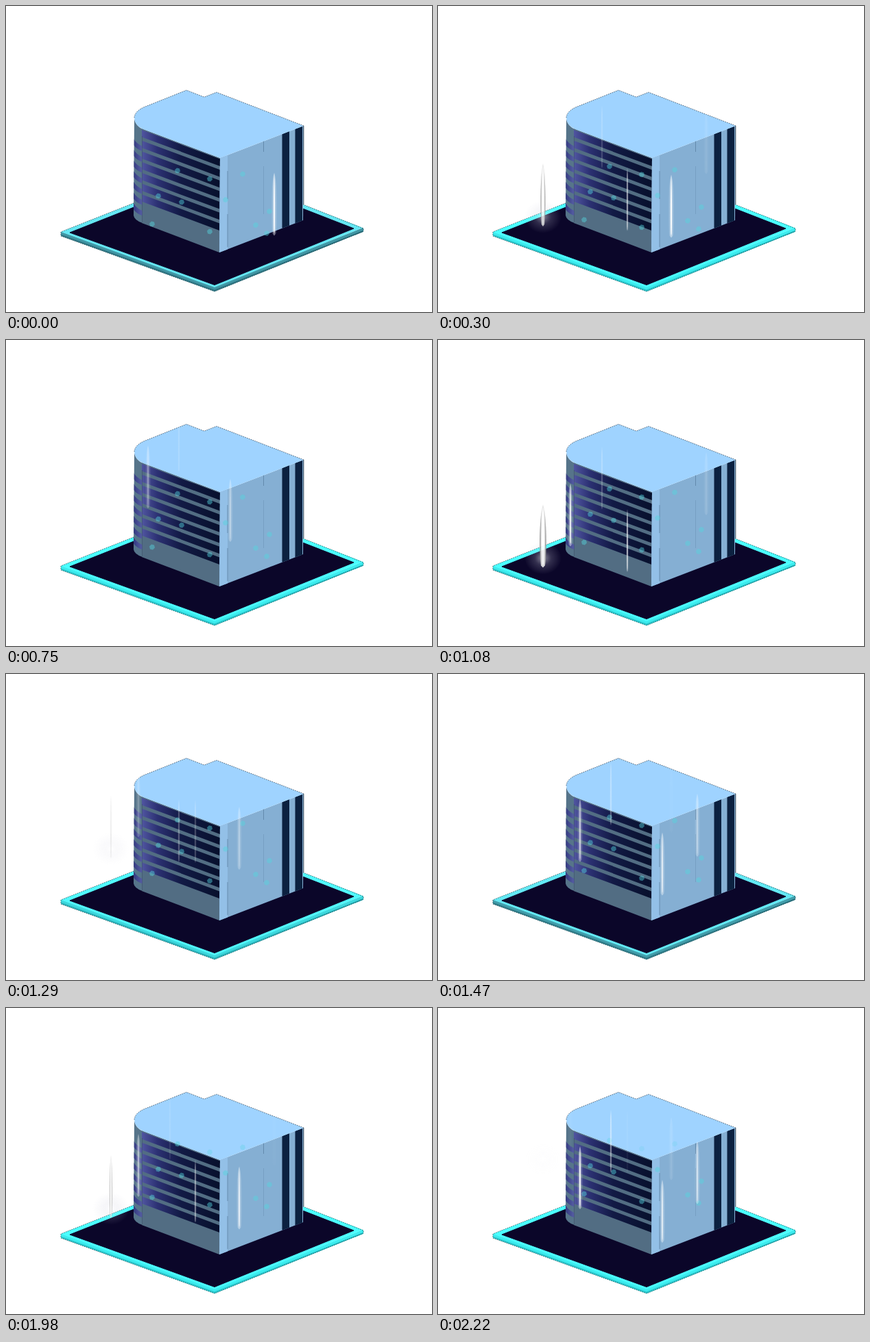
Write an HTML page that moves like this. It is 621 px wide and 447 px high and loops after 2250 ms.

```html
<!DOCTYPE html>
<html lang="en">
<head>
<meta charset="utf-8">
<title>Isometric building</title>
<style>
html, body { margin: 0; width: 100%; height: 100%; overflow: hidden; background: #fff; }
svg { display: block; width: 621px; height: 447px; }
</style>
</head>
<body>
<svg viewBox="0 0 621 447" xmlns="http://www.w3.org/2000/svg">
  <defs>
    <linearGradient id="stripe" gradientUnits="userSpaceOnUse" x1="198" y1="0" x2="312" y2="0">
      <stop offset="0" stop-color="#5055a0"/>
      <stop offset=".2" stop-color="#2c3173"/>
      <stop offset=".5" stop-color="#121a45"/>
      <stop offset="1" stop-color="#07102c"/>
    </linearGradient>
    <linearGradient id="bend" gradientUnits="userSpaceOnUse" x1="186" y1="0" x2="199" y2="0">
      <stop offset="0" stop-color="#343a80"/>
      <stop offset="1" stop-color="#5860a6"/>
    </linearGradient>
    <linearGradient id="beam">
      <stop offset="0" stop-color="#fff" stop-opacity="0"/>
      <stop offset=".5" stop-color="#fff" stop-opacity=".55"/>
      <stop offset="1" stop-color="#fff" stop-opacity="0"/>
    </linearGradient>
    <linearGradient id="metal">
      <stop offset="0" stop-color="#888"/>
      <stop offset=".3" stop-color="#e6e6e6"/>
      <stop offset=".7" stop-color="#e6e6e6"/>
      <stop offset="1" stop-color="#888"/>
    </linearGradient>
    <radialGradient id="halo">
      <stop offset="0" stop-color="#fff" stop-opacity=".6"/>
      <stop offset=".45" stop-color="#ccd" stop-opacity=".22"/>
      <stop offset="1" stop-color="#ccd" stop-opacity="0"/>
    </radialGradient>
    <clipPath id="front"><path d="M198 179L312 222L311 360L198 317Z"/></clipPath>
    <clipPath id="corner"><path d="M187 165Q189 175 199 180V317Q187 313 186 306Z"/></clipPath>
  </defs>

  <g stroke-linejoin="round">
    <path id="side" d="M81 331L304 411L520 325V329L304 416L81 335Z" stroke-width="2"/>
    <path id="edge" d="M81 335L304 415.500L520 329" fill="none" stroke-width="2"/>
    <path id="rim" d="M80 330L306 240.500L520 324L304 411Z"/>
    <path d="M93 331L306 246.500L507 325L304 407.500Z" fill="#0b0629" stroke="#0b0629"/>
    <path d="M186 288L80 330V336L304 417L521 329V325L433 290" fill="none" stroke="#123a42" stroke-width=".8" stroke-dasharray="1.5 1.5"/>
  </g>

  <path d="M187 165Q189 175 199 180V317Q187 313 186 306Z" fill="#56748a"/>
  <path d="M198 179L312 222L311 360L198 317Z" fill="#526d83"/>
  <g id="bends" clip-path="url(#corner)" fill="url(#bend)"/>
  <g id="stripes" clip-path="url(#front)" fill="url(#stripe)"/>
  <path d="M198.5 190V316" stroke="#3b5068" stroke-width=".8" opacity=".7"/>
  <path d="M312 222L434 175L433 313L311 360Z" fill="#85afd3"/>
  <path d="M312 222L323 218V355.400L311 360Z" fill="#93c0e7"/>
  <g id="bands" fill="#0c2140"/>
  <path d="M323 241V282M323 304V352M375.500 196V213" stroke="#517799" stroke-width=".8" opacity=".8"/>
  <path d="M375.500 234V304" stroke="#517799" stroke-width=".8" opacity=".35"/>
  <path d="M187 163Q188 153 203 147L263 123L289 133L307 126L434 175L312 222L200 180Q187 174 187 163Z" fill="#9fd3ff"/>
  <path d="M187 163Q188 153 203 147L263 123L289 133L307 126L434 175" fill="none" stroke="#26394b" stroke-width=".8" stroke-dasharray="1.500 1.500"/>
  <path d="M433.800 175V290" stroke="#26394b" stroke-width="1"/>
  <g id="dots" fill="#54d4dd"/>
  <g id="beams"/>
</svg>
<script>
const LOOP = 2250, STEP = 30;
const DRIFT = 0.0212;                          // lights, px per ms
const RISE = 0.3, PERIOD = 815, LIFE = 390;    // beams
const PULSE = 1490;                            // platform glow

const $ = id => document.getElementById(id);
const clamp = v => Math.max(0, Math.min(1, v));
const mix = (a, b, k) => `rgb(${a.map((v, i) => Math.round(v + (b[i] - v) * k))})`;

function set(el, attrs) {
  for (const k in attrs) el.setAttribute(k, attrs[k]);
  return el;
}
function add(parent, tag, attrs = {}) {
  return parent.appendChild(set(document.createElementNS("http://www.w3.org/2000/svg", tag), attrs));
}

// Walls
const roofY = x => x < 312 ? 180 + (x - 200) * 0.375 : 222 - (x - 312) * 0.385;
const footY = x => 360 - (x - 311) * 0.385;
for (let i = 0; i < 7; i++) {
  const y = 181 + i * 15.7, b = y + 13;
  add($("stripes"), "path", { d: `M198 ${y}l114 42.500v10.500l-114 -42.500Z` });
  add($("bends"), "path", { d: `M186 ${b}q4 7 13 11v7q-9 -3 -13 -9Z` });
}
for (const l of [402.5, 421.5]) {
  const r = l + 10.5;
  add($("bands"), "path", { d: `M${l} ${roofY(l)}L${r} ${roofY(r)}V${footY(r)}L${l} ${footY(l)}Z` });
}

// Drifting lights: x, starting y
const dots = [
  [250, 240.5], [297, 252.5], [345, 245.5], [222, 277.5], [256, 286.5], [320, 283],
  [384, 300], [364, 320], [380, 332], [213, 318.5], [297, 329.5]
].map(([x, y]) => ({ x, y, el: add($("dots"), "polygon", { points: "-4,-1 -1,-4 3,-3 4,1 1,4 -3,3" }) }));

// Rising beams: x, lowest y, first launch
const beams = [
  [153, 340, 240], [193, 312, 1045], [207, 300, 570], [239, 315, 40], [252, 275, 475],
  [276, 345, 245], [327, 346, 580], [340, 343, 285], [378, 318, 1300], [391, 343, -25]
].map(([x, base, first]) => {
  const g = add($("beams"), "g"), outside = x < 180;
  return {
    x, base, first, g, outside,
    width: x > 230 && x < 300 ? 4.5 : 10,
    halo: add(g, "ellipse", { cx: x, rx: outside ? 27 : 0, ry: 24, fill: "url(#halo)" }),
    glow: add(g, "path", { fill: outside ? "url(#metal)" : "url(#beam)" }),
    core: add(g, "path", { fill: "#fff" })
  };
});

function spindle(x, top, len, w) {
  const h = w / 2;
  return `M${x} ${top}c${h} ${len * 0.15} ${h} ${len * 0.85} ${h * 0.5} ${len - 3}` +
    `L${x} ${top + len}l${-h * 0.5} -3c${-h * 0.5} ${-len * 0.15} ${-h * 0.5} ${-len * 0.8} ${h * 0.5} ${3 - len}Z`;
}

function drawBeam(b, t) {
  const age = t < b.first ? -1 : (t - b.first) % PERIOD;
  const power = age < 0 ? 0 : clamp((age + 15) / 30) * clamp(1 - age / LIFE);
  set(b.g, { opacity: power });
  if (!power) return;
  const bottom = b.base - age * RISE, len = 92, top = bottom - len;
  const w = b.outside ? 14 * power ** 3 : b.width;
  set(b.halo, { cy: bottom - 14 });
  set(b.glow, { d: spindle(b.x, top, len, w) });
  set(b.core, { d: spindle(b.x, top + 4, len - 7, w * (b.outside ? 0.5 : 0.26)), opacity: power });
}

function draw(t) {
  const phase = t % PULSE;
  const lit = clamp(Math.min(phase, PULSE - phase) / 260);
  const side = mix([65, 151, 165], [60, 236, 238], lit);
  set($("side"), { fill: side, stroke: side });
  set($("edge"), { stroke: mix([48, 118, 132], [42, 196, 202], lit) });
  set($("rim"), { fill: mix([101, 231, 243], [75, 255, 255], lit) });

  for (const d of dots) {
    const y = d.y - t * DRIFT;
    set(d.el, { transform: `translate(${d.x} ${y})`, opacity: 0.45 * clamp((y - roofY(d.x) + 18) / 18) });
  }
  for (const b of beams) drawBeam(b, t);
}

function tick(now) {
  draw(Math.floor((now % LOOP) / STEP) * STEP);
  requestAnimationFrame(tick);
}
draw(0);
requestAnimationFrame(tick);
</script>
</body>
</html>
```
